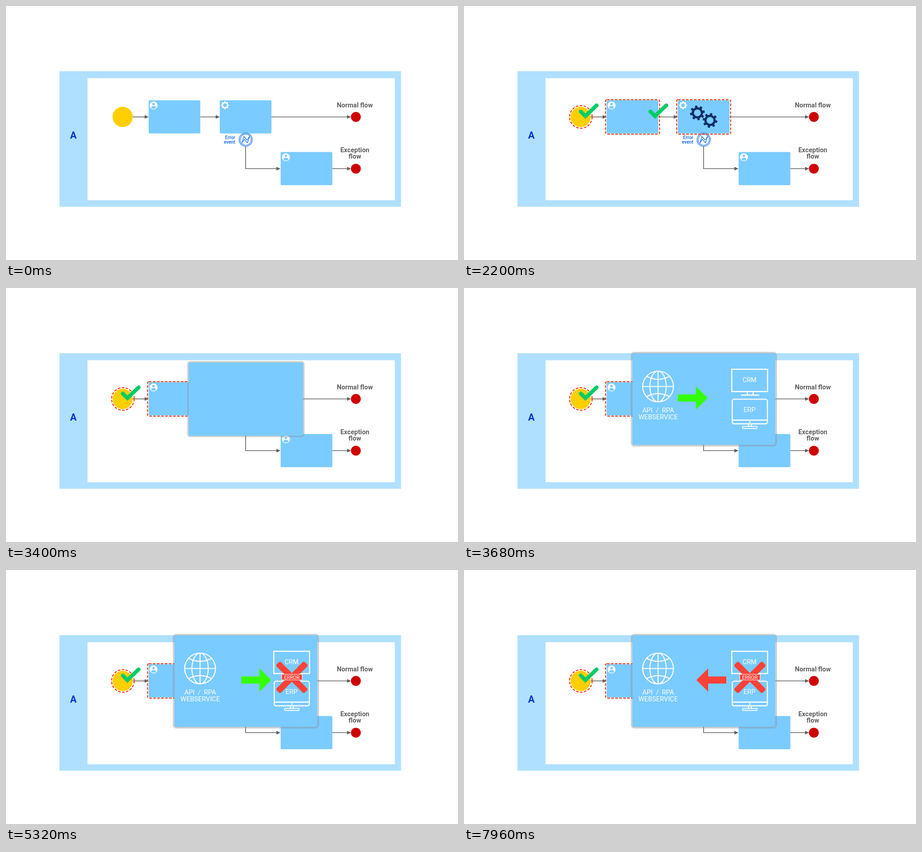
These frames come from a looping animation (998x561 px, 8000 ms). An HTML page with a canvas:

```html
<!DOCTYPE html>
<html lang="en">
<head>
<meta charset="utf-8">
<title>Error event flow</title>
<style>
html, body { margin: 0; width: 100%; height: 100%; overflow: hidden; background: #fff; }
canvas { display: block; width: 998px; height: 561px; }
</style>
</head>
<body>
<canvas id="stage" width="998" height="561"></canvas>
<script>
const ctx = document.getElementById('stage').getContext('2d');
const LOOP = 8000, STEP = 40;
const BLUE = '#7acbff', PALE = '#b0e0ff', GREY = '#606060', RED = '#cf0000';
const ALERT = '#ff4136', DASH = '#ff2a00', INK = '#0a66f0', WHITE = '#fff';

const ramp = (t, a, b) => Math.min(1, Math.max(0, (t - a) / (b - a)));
const easeSine = u => (1 - Math.cos(Math.PI * u)) / 2;

function layer(alpha, draw) {
  if (alpha <= 0) return;
  ctx.save();
  ctx.globalAlpha *= alpha;
  draw();
  ctx.restore();
}

function box(x, y, w, h, r, color) {
  ctx.beginPath();
  ctx.roundRect(x, y, w, h, r);
  ctx.fillStyle = color;
  ctx.fill();
}

function disc(x, y, r, color) {
  ctx.beginPath();
  ctx.arc(x, y, r, 0, Math.PI * 2);
  ctx.fillStyle = color;
  ctx.fill();
}

function stroke(color, width) {
  ctx.strokeStyle = color;
  ctx.lineWidth = width;
  ctx.stroke();
}

function trace(points, closed) {
  ctx.beginPath();
  points.forEach(([x, y]) => ctx.lineTo(x, y));
  if (closed) ctx.closePath();
}

function text(str, x, y, size, weight, color, align = 'center') {
  ctx.font = `${weight} ${size}px Roboto, sans-serif`;
  ctx.textAlign = align;
  ctx.fillStyle = color;
  ctx.fillText(str, x, y);
}

// Connector ending in a small head that points right.
function connector(...points) {
  const [x, y] = points[points.length - 1];
  trace([...points.slice(0, -1), [x - 6, y]]);
  stroke(GREY, 1.6);
  trace([[x, y], [x - 9, y - 4], [x - 9, y + 4]], true);
  ctx.fillStyle = GREY;
  ctx.fill();
}

function userIcon(x, y) {
  disc(x, y, 8.8, WHITE);
  disc(x, y - 2.9, 2.7, BLUE);
  ctx.beginPath();
  ctx.ellipse(x, y + 4.3, 5.3, 3, 0, 0, Math.PI * 2);
  ctx.fill();
}

function gear(x, y, outer, root, hole, turn, color) {
  const teeth = 8, pitch = Math.PI * 2 / teeth;
  ctx.beginPath();
  for (let i = 0; i < teeth; i++) {
    const a = turn + i * pitch;
    ctx.arc(x, y, root, a - pitch * 0.5, a - pitch * 0.27);
    ctx.arc(x, y, outer, a - pitch * 0.2, a + pitch * 0.2);
    ctx.arc(x, y, root, a + pitch * 0.27, a + pitch * 0.5);
  }
  ctx.closePath();
  ctx.moveTo(x + hole, y);
  ctx.arc(x, y, hole, 0, Math.PI * 2);
  ctx.fillStyle = color;
  ctx.fill('evenodd');
}

function errorEvent() {
  disc(529.2, 295.3, 14.7, WHITE);
  stroke(INK, 1.2);
  ctx.beginPath();
  ctx.arc(529.2, 295.3, 12.2, 0, Math.PI * 2);
  stroke(INK, 1.1);
  trace([[521.3, 302], [525.3, 288], [532, 296.2], [538, 288.2],
    [533, 302.2], [526.4, 294.4]], true);
  stroke(INK, 1.2);
}

function diagram() {
  box(118, 144, 754.3, 299.5, 0, PALE);
  box(180, 159.5, 678.5, 269.5, 0, WHITE);
  text('A', 148.8, 292.8, 21.5, 700, '#0033cc');

  connector([279, 245], [315, 245]);
  connector([429, 245], [472, 245]);
  connector([586, 245], [762, 245]);
  connector([529, 309], [529, 359.3], [606, 359.3]);
  connector([720, 359.3], [762, 359.3]);

  disc(257.6, 245, 22.4, '#ffcf00');
  disc(772.5, 245, 10.9, RED);
  disc(772.5, 359.3, 10.9, RED);
  box(315, 208.3, 114, 73.2, 2.5, BLUE);
  box(472, 208.3, 114.2, 73.2, 2.5, BLUE);
  box(606.4, 322.6, 114.2, 73.2, 2.5, BLUE);
  userIcon(325.8, 219.6);
  userIcon(618, 334);
  gear(483.6, 219.2, 8.8, 6.9, 4.2, 0, WHITE);
  errorEvent();

  text('Error', 506.2, 294.4, 10.3, 500, INK, 'right');
  text('event', 506.2, 304.4, 10.3, 500, INK, 'right');
  text('Normal flow', 770.2, 224, 14.5, 700, GREY);
  text('Exception', 770.2, 323, 14.5, 700, GREY);
  text('flow', 770.2, 337.4, 14.5, 700, GREY);
}

function dashed(shape) {
  ctx.setLineDash([5.6, 3.2]);
  ctx.beginPath();
  shape();
  stroke(DASH, 2);
  ctx.setLineDash([]);
}

const dashedTask = x => dashed(() => ctx.roundRect(x, 207, 119.2, 76, 3));

function check(x) {
  ctx.lineCap = 'round';
  trace([[x, 233], [x + 10.3, 243.2], [x + 35, 219.5]]);
  stroke('#00cc66', 8.6);
  ctx.lineCap = 'butt';
}

function progress(t) {
  layer(ramp(t, 360, 680), () => {
    dashed(() => ctx.arc(258, 245, 25, 0, Math.PI * 2));
    check(257.8);
  });
  layer(ramp(t, 960, 1360), () => {
    dashedTask(312.6);
    check(411.6);
  });
  layer(ramp(t, 1680, 2040), () => dashedTask(469.6));
  layer(ramp(t, 1880, 2160), () => {
    const turn = (t - 2200) * 0.0012;
    gear(515.3, 236, 16.3, 12.4, 7.6, turn - 0.18, '#0a2f66');
    gear(543.2, 252.7, 16.3, 12.4, 7.6, -turn + 0.18, '#0a2f66');
  });
}

function globe(x, y, r) {
  ctx.beginPath();
  ctx.arc(x, y, r, 0, Math.PI * 2);
  ctx.moveTo(x + r * 0.53, y);
  ctx.ellipse(x, y, r * 0.53, r, 0, 0, Math.PI * 2);
  ctx.moveTo(x, y - r);
  ctx.lineTo(x, y + r);
  ctx.moveTo(x - r, y);
  ctx.lineTo(x + r, y);
  for (const s of [-1, 1]) {
    ctx.moveTo(x - r * 0.75, y + s * r * 0.66);
    ctx.quadraticCurveTo(x, y + s * r * 0.26, x + r * 0.75, y + s * r * 0.66);
  }
  stroke(WHITE, 2.2);
}

function monitors() {
  ctx.beginPath();
  ctx.rect(591.2, 179.5, 79, 49.3);
  for (const x of [625.5, 638.5]) {
    ctx.moveTo(x, 229);
    ctx.lineTo(x, 236);
  }
  ctx.moveTo(611.5, 236.5);
  ctx.lineTo(652, 236.5);
  stroke(WHITE, 2.5);
  text('CRM', 630.5, 208, 14.5, 400, WHITE);

  ctx.beginPath();
  ctx.roundRect(592.3, 245.6, 77.6, 54.4, 4);
  ctx.moveTo(592, 291.8);
  ctx.lineTo(670, 291.8);
  stroke(WHITE, 2.4);
  disc(631, 296, 1.8, WHITE);
  trace([[628.3, 300], [627.3, 305.5], [634.9, 305.5], [633.9, 300]]);
  stroke(WHITE, 1.8);
  ctx.beginPath();
  ctx.roundRect(615, 305.6, 32.3, 4.6, 1.5);
  stroke(WHITE, 1.9);
  text('ERP', 630.5, 274, 14.5, 400, WHITE);
}

function card(t) {
  layer(ramp(t, 2880, 3000), () => {
    const scale = 0.358 + 0.642 * easeSine(ramp(t, 3000, 3640));
    ctx.translate(529.7, 245.4);
    ctx.scale(scale, scale);
    ctx.translate(-529.7, -245.4);
    box(372, 144.6, 315.3, 201.8, 4, BLUE);
    ctx.beginPath();
    ctx.roundRect(370.2, 142.8, 319, 205.3, 6);
    stroke('rgba(140,140,145,.42)', 3.8);
    layer(ramp(t, 3440, 3640), () => {
      globe(428.5, 217.5, 34);
      text('API  /  RPA', 428.8, 274.6, 14.6, 400, WHITE);
      text('WEBSERVICE', 428.8, 290, 14.6, 400, WHITE);
      monitors();
    });
  });
}

// Block arrow with its tip at x; dir is 1 for right, -1 for left.
function blockArrow(x, dir, color) {
  const y = 243, neck = x - dir * 26, tail = x - dir * 66;
  trace([[x, y], [neck, y - 25.6], [neck, y - 7.8], [tail, y - 7.8],
    [tail, y + 7.8], [neck, y + 7.8], [neck, y + 25.6]], true);
  ctx.fillStyle = color;
  ctx.fill();
}

function errorMark() {
  for (const angle of [1, -1]) {
    ctx.save();
    ctx.translate(631.2, 237.2);
    ctx.rotate(angle * Math.PI / 4);
    box(-44, -6.8, 88, 13.6, 4, ALERT);
    ctx.restore();
  }
  box(608.6, 230.2, 45.4, 12.8, 0, ALERT);
  stroke(WHITE, 1.1);
  text('ERROR', 631.1, 240.5, 11, 400, WHITE);
}

function messages(t) {
  if (t >= 7720) blockArrow(520 - 0.029 * (t - 7720), -1, ALERT);
  else if (t >= 3640) blockArrow(538 + 47.6 * ramp(t, 3680, 5320), 1, '#33ff00');
  layer(ramp(t, 5040, 5320), errorMark);
}

function frame(now) {
  const t = Math.floor(now % LOOP / STEP) * STEP;
  ctx.fillStyle = WHITE;
  ctx.fillRect(0, 0, 998, 561);
  diagram();
  progress(t);
  card(t);
  messages(t);
}

let start;
function tick(now) {
  start ??= now;
  frame(now - start);
  requestAnimationFrame(tick);
}
frame(0);
requestAnimationFrame(tick);
</script>
</body>
</html>
```
